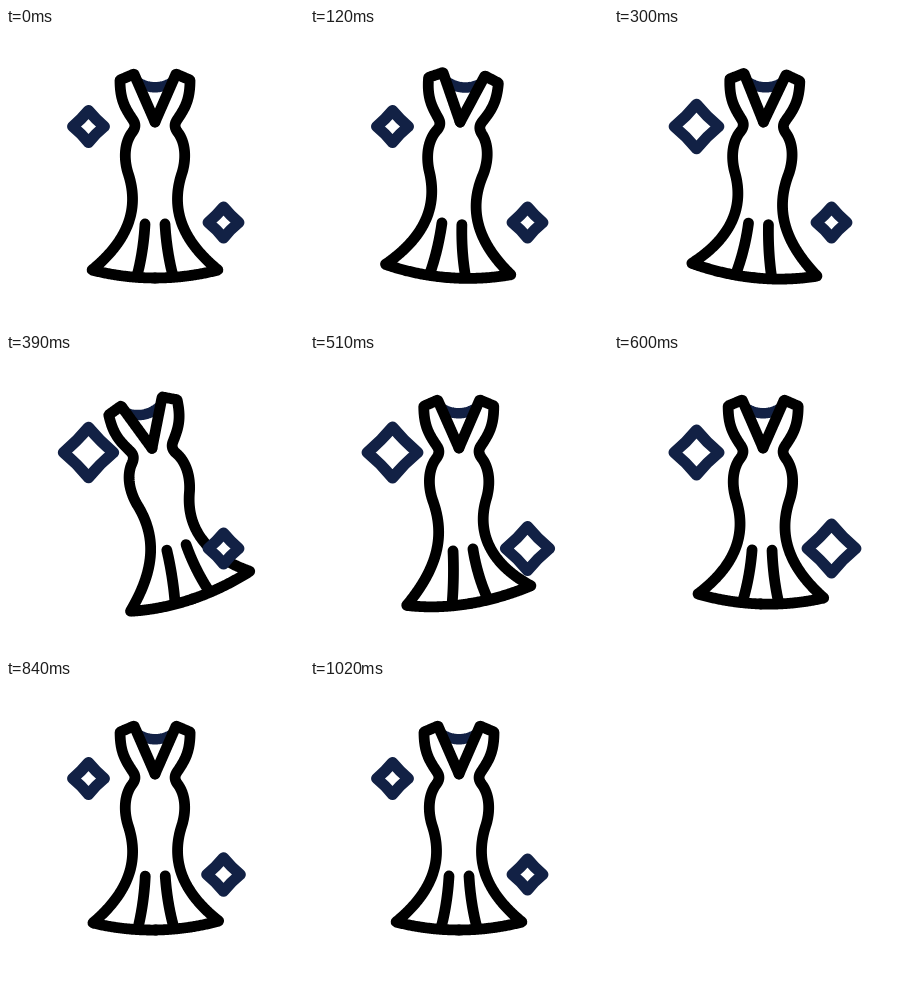
An HTML page with a canvas that plays this animation: 298 by 298 pixels, repeating every 1200 ms.

```html
<!DOCTYPE html>
<html lang="en">
<head>
<meta charset="utf-8">
<title>Swinging dress</title>
<style>
html, body { margin: 0; width: 100%; height: 100%; overflow: hidden; background: #fff; }
canvas { display: block; width: 100vmin; height: 100vmin; }
</style>
</head>
<body>
<canvas id="stage" width="298" height="298"></canvas>
<script>
const ctx = document.getElementById('stage').getContext('2d');
const LOOP = 1200, STEP = 30;
const BLACK = '#000', NAVY = '#122145', WHITE = '#fff';
const AXIS = 149, PIVOT_Y = 108, BEND_Y = 120, BEND_LENGTH = 123;

// Keys are [time, value]; each span eases in and out.
const swing = [[10, 0], [235, 9.5], [400, -12.7], [520, 0], [700, 0.4], [900, 0]];
const bend = [[110, 0], [240, 7.3], [450, -9.4], [490, -9.4], [650, 5], [850, -1], [1020, 0]];
const leftStar = [[105, 15.8], [420, 25.3], [530, 25.3], [720, 15.8]];
const rightStar = [[390, 15.3], [570, 24.3], [660, 24.3], [900, 15.3]];

// Samples an SVG path into points that can be bent.
function trace(d) {
  const path = document.createElementNS('http://www.w3.org/2000/svg', 'path');
  path.setAttribute('d', d);
  const length = path.getTotalLength(), count = Math.ceil(length);
  return Array.from({ length: count + 1 }, (_, i) => {
    const p = path.getPointAtLength(length * i / count);
    return [p.x, p.y];
  });
}

const mirror = points => points.map(([x, y]) => [2 * AXIS - x, y]);

const neck = trace('M134 55.5Q149 63 164 55.5');
const side = trace('M149 94L128 46L114 52C114 72 119 80 127 92C131 98 128 102 125 106' +
  'C118 117 118 132 122 145C131 172 130 206 86 242Q117 250 149 250');
const pleat = trace('M139 196Q137.5 222 131.5 246');
const dress = [side, mirror(side), pleat, mirror(pleat)];

function valueAt(keys, t) {
  if (t <= keys[0][0]) return keys[0][1];
  const next = keys.findIndex(key => key[0] > t);
  if (next < 0) return keys[keys.length - 1][1];
  const [t0, a] = keys[next - 1], [t1, b] = keys[next];
  const u = (t - t0) / (t1 - t0);
  return a + (b - a) * u * u * (3 - 2 * u);
}

function rotate(x, y, angle) {
  const c = Math.cos(angle), s = Math.sin(angle);
  return [x * c - y * s, x * s + y * c];
}

// Bends the skirt below the hips, then swings the whole dress.
function pose([x, y], swingAngle, bendAngle) {
  let dx = x - AXIS, dy = y - PIVOT_Y;
  const drop = y - BEND_Y;
  if (drop > 0) {
    const angle = bendAngle * drop / BEND_LENGTH;
    const [ox, oy] = rotate(dx, 0, angle);
    dx = ox - drop * Math.sin(angle / 2);
    dy = oy + drop * Math.cos(angle / 2) + BEND_Y - PIVOT_Y;
  }
  const [px, py] = rotate(dx, dy, swingAngle);
  return [AXIS + px, PIVOT_Y + py];
}

function strokePoints(points, color, width) {
  ctx.beginPath();
  points.forEach(p => ctx.lineTo(...p));
  ctx.strokeStyle = color;
  ctx.lineWidth = width;
  ctx.stroke();
}

function drawStar(x, y, r) {
  const c = r * 0.45;
  ctx.beginPath();
  ctx.moveTo(x, y - r);
  ctx.quadraticCurveTo(x + c, y - c, x + r, y);
  ctx.quadraticCurveTo(x + c, y + c, x, y + r);
  ctx.quadraticCurveTo(x - c, y + c, x - r, y);
  ctx.quadraticCurveTo(x - c, y - c, x, y - r);
  ctx.closePath();
  ctx.fillStyle = WHITE;
  ctx.fill();
  ctx.strokeStyle = NAVY;
  ctx.lineWidth = 11.3;
  ctx.stroke();
}

function draw(t) {
  const a = valueAt(swing, t) * Math.PI / 180;
  const b = valueAt(bend, t) * Math.PI / 180;
  const posed = points => points.map(p => pose(p, a, b));
  ctx.fillStyle = WHITE;
  ctx.fillRect(0, 0, 298, 298);
  ctx.lineCap = ctx.lineJoin = 'round';
  strokePoints(posed(neck), NAVY, 10.5);
  dress.forEach(line => strokePoints(posed(line), BLACK, 10.8));
  drawStar(82.5, 98.5, valueAt(leftStar, t));
  drawStar(217.5, 194.5, valueAt(rightStar, t));
}

function tick() {
  draw(Math.floor(performance.now() % LOOP / STEP) * STEP);
  requestAnimationFrame(tick);
}
tick();
</script>
</body>
</html>
```
